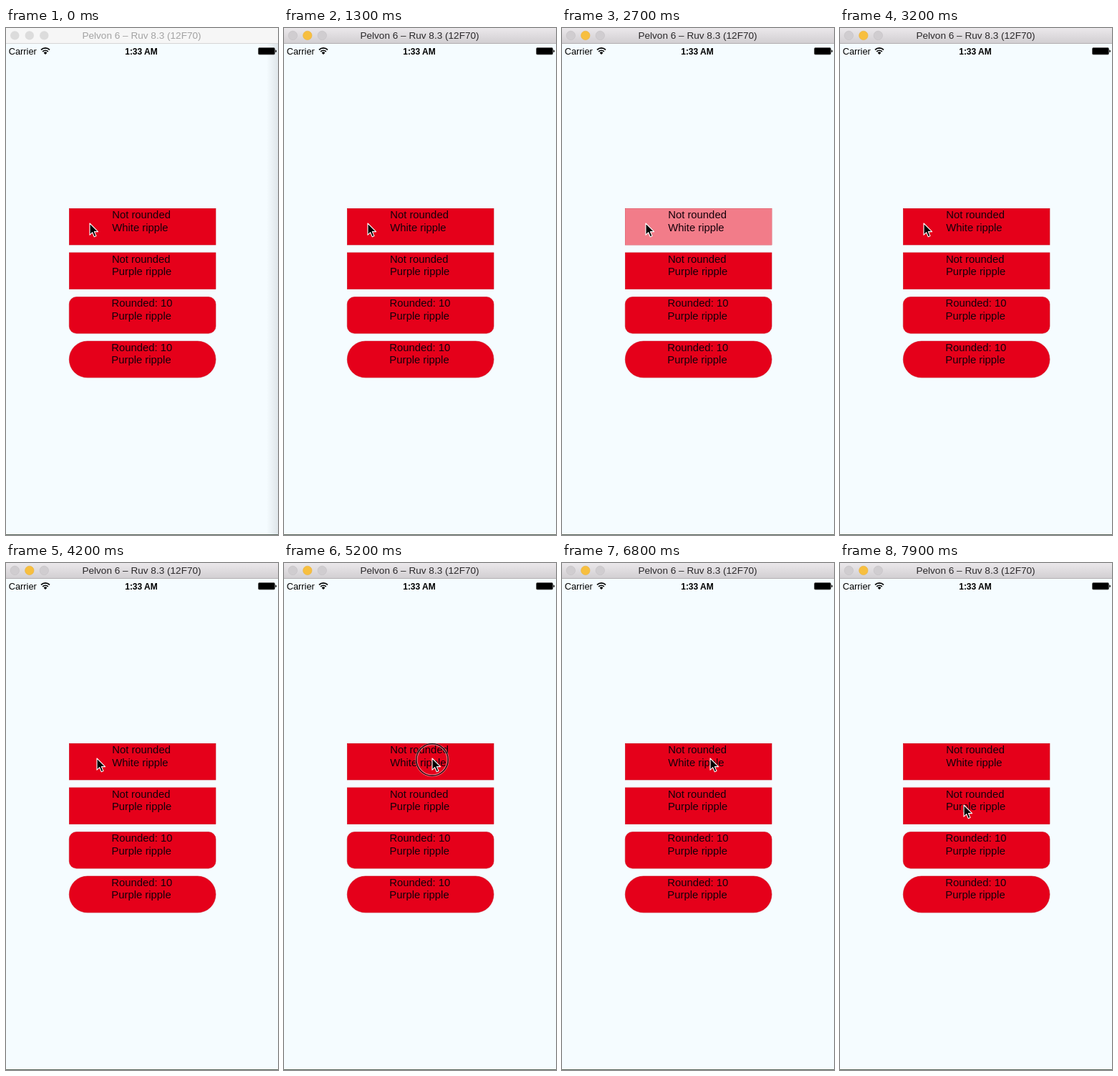
These frames come from a looping animation (380x706 px, 8000 ms). An HTML page:

```html
<!DOCTYPE html>
<html lang="en">
<head>
<meta charset="utf-8">
<title>Ripple buttons</title>
<style>
  html, body { margin: 0; width: 100%; height: 100%; overflow: hidden; background: #f5fcff; }
  svg { display: block; width: 380px; height: 706px; }
  text { font-family: "Liberation Sans", Arial, sans-serif; }
  .label { font-size: 14.85px; fill: #14000a; }
  .lamp { fill: #dcdcdc; }
  .active .lamp { fill: #d0cdd0; stroke: #c3c0c3; stroke-width: .6; }
  .active .lamp.mid { fill: #f7bf3f; stroke: #eab13c; }
  #bar { fill: #f6f6f6; }
  .active #bar { fill: url(#chrome); }
  #rule { fill: #d6d6d6; }
  .active #rule { fill: #b4b0b3; }
  #title { font-size: 13.6px; fill: #a3a3a3; }
  .active #title { fill: #2b292b; }
  .active #shade { display: none; }
</style>
</head>
<body>
<svg id="stage" viewBox="0 0 380 706">
  <defs>
    <linearGradient id="chrome" x2="0" y2="1">
      <stop stop-color="#ebe8eb"/><stop offset="1" stop-color="#d2cfd2"/>
    </linearGradient>
    <linearGradient id="edge">
      <stop stop-color="#dfe6ea" stop-opacity="0"/><stop offset="1" stop-color="#dfe6ea"/>
    </linearGradient>
    <clipPath id="clip"><rect x="88" y="251" width="205.3" height="51.3"/></clipPath>
  </defs>
  <rect width="380" height="706" fill="#f5fcff"/>
  <rect id="shade" x="364" y="22" width="16" height="684" fill="url(#edge)"/>
  <rect id="bar" width="380" height="21"/>
  <rect id="rule" y="21" width="380" height="1"/>
  <circle class="lamp" cx="12.3" cy="10.4" r="6.2"/>
  <circle class="lamp mid" cx="32.8" cy="10.4" r="6.2"/>
  <circle class="lamp" cx="53.3" cy="10.4" r="6.2"/>
  <text id="title" x="189.5" y="15.3" text-anchor="middle">Pelvon 6 – Ruv 8.3 (12F70)</text>

  <text x="3.7" y="36.6" font-size="12.8">Carrier</text>
  <path d="M49 30.4a8.6 8.6 0 0 1 12 0M51.2 32.8a5.4 5.4 0 0 1 7.6 0" fill="none" stroke="#000" stroke-width="1.7"/>
  <path d="M55 37l-2.4-2.6a3.4 3.4 0 0 1 4.8 0z"/>
  <text x="189" y="36.6" font-size="12" font-weight="bold" text-anchor="middle">1:33 AM</text>
  <rect x="352.5" y="27.5" width="23" height="9.4" rx="1.5" stroke="#555" stroke-width=".8"/>
  <path d="M376.4 30.3q1.6.4 1.6 1.9t-1.6 1.9z"/>

  <g id="buttons"></g>
  <g id="waves" clip-path="url(#clip)" fill="#fff"></g>
  <rect y="705" width="380" height="1" fill="#59665c"/>
  <g id="ring" fill="none" opacity=".85">
    <circle r="22" stroke="#fff" stroke-opacity=".6" stroke-width="3.2"/>
    <circle r="22.2" stroke="#0a0508" stroke-width="1.5"/>
  </g>
  <path id="cursor" d="M0 0V16.2L3.7 12.7 6.3 18.8 9 17.6 6.4 11.6H11.6Z"
    stroke="#fff" stroke-width="1.1" stroke-linejoin="round"/>
</svg>
<script>
const $ = id => document.getElementById(id);
const LOOP = 8000, STEP = 100;
const BURSTS = [1550, 5200], CLICKS = 4, GAP = 350, HOLD = 100, FADE = 450;

function set(el, attrs) {
  for (const k in attrs) el.setAttribute(k, attrs[k]);
  return el;
}

function add(parent, tag, attrs, text = "") {
  const el = set(document.createElementNS("http://www.w3.org/2000/svg", tag), attrs);
  el.textContent = text;
  parent.append(el);
  return el;
}

const buttons = $("buttons"), tints = [];
[0, 0, 10, 25.3].forEach((rx, i) => {
  const y = 251 + 61.6 * i, x = 148.2 - .3 * i;
  const box = { x: 88.3, y: y + .3, width: 204.7, height: 50.7, rx };
  add(buttons, "rect", { ...box, fill: "#e5001a", stroke: "#cc0a20", "stroke-width": .6 });
  if (!i) for (let n = 0; n < 2; n++) tints.push(add(buttons, "rect", { ...box, fill: "#fff" }));
  add(buttons, "text", { x, y: y + 14, class: "label" }, rx ? "Rounded: 10" : "Not rounded");
  add(buttons, "text", { x, y: y + 31.5, class: "label" }, i ? "Purple ripple" : "White ripple");
});
const waves = tints.map(() => add($("waves"), "circle", {}));

const presses = BURSTS.flatMap(t => Array.from({ length: CLICKS }, (_, i) => t + i * GAP));

const ramp = (t, from, to) => Math.min(1, Math.max(0, (t - from) / (to - from)));

// The pointer circles the first button twice, drops to the second and flicks aside once.
function tipAt(t) {
  const a = ramp(t, 3400, 4200), b = ramp(t, 4200, 5200), drop = ramp(t, 6900, 7300);
  const turn = 2 * Math.PI * (a + b), arc = 1 - Math.cos(turn);
  const flick = ramp(t, 7500, 7600) - ramp(t, 7600, 7700);
  return [
    117 + 10 * a + 80 * b - 34 * drop + 85 * flick + 30 * arc - 60 * Math.sin(turn),
    272 + 65 * drop + 76 * flick - 14 * arc
  ];
}

function draw(t) {
  $("stage").classList.toggle("active", t >= 1300);
  const [x, y] = tipAt(t);
  set($("cursor"), { transform: `translate(${x} ${y})` });
  const down = presses.some(p => t >= p && t < p + HOLD);
  set($("ring"), { transform: `translate(${x} ${y + 2})`, visibility: down ? "visible" : "hidden" });

  // each ripple starts on release
  const live = presses.map(p => (t - p - HOLD) / FADE).filter(k => k >= 0 && k < 1);
  tints.forEach((tint, i) => {
    const k = live[i] ?? 1;
    set(tint, { opacity: .43 * (1 - k) });
    set(waves[i], { cx: x, cy: y + 2, r: Math.max(0, 380 * k - 32), opacity: .65 * (1 - k) ** 4 });
  });
}

function tick() {
  draw(Math.floor(performance.now() % LOOP / STEP) * STEP);
  requestAnimationFrame(tick);
}
tick();
</script>
</body>
</html>
```
